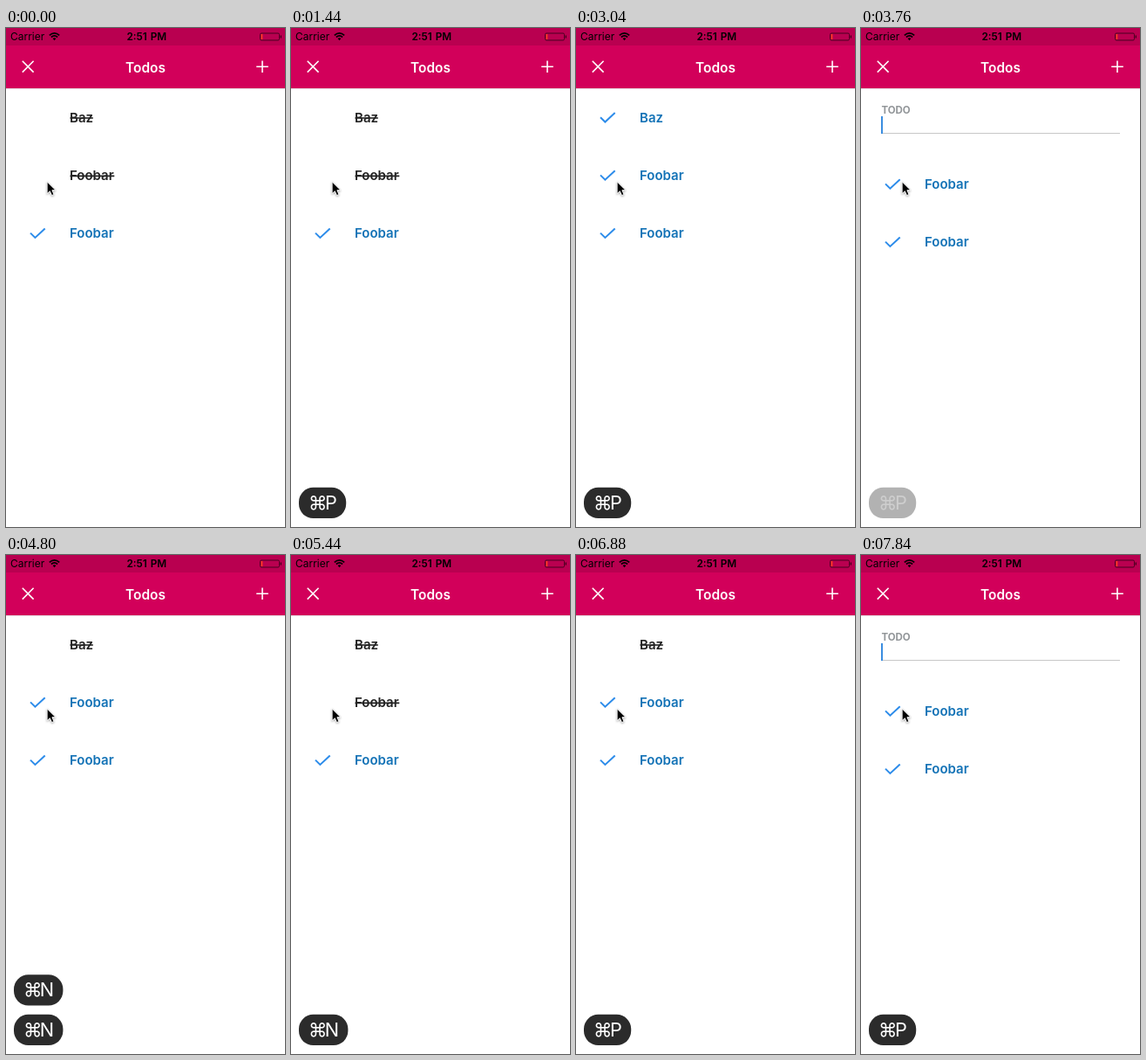
An HTML page that plays this animation: 320 by 571 pixels, repeating every 8 s.

```html
<!DOCTYPE html>
<html lang="en">
<head>
<meta charset="utf-8">
<title>Todos</title>
<style>
  html, body { margin: 0; width: 100%; height: 100%; overflow: hidden; background: #fff; }
  svg { display: block; width: 100%; height: 100%; }
  text { font: 600 15px Inter, "Liberation Sans", sans-serif; letter-spacing: 0; }

  .status { font-size: 12px; font-weight: 400; }
  .clock { font-size: 11.8px; font-weight: 600; word-spacing: 1px; }
  .title { font-size: 15.4px; fill: #fff; text-anchor: middle; }
  .line { fill: none; stroke: #fff; stroke-width: 1.6; }
  .check { fill: none; stroke: #2d8cea; stroke-width: 2; }
  .active text { fill: #1272b6; }
  .done text { fill: #222; }
  .done path { stroke: #222; stroke-width: 1.6; }
  .label { font-size: 11.5px; font-weight: 700; fill: #929699; }
  .badge rect { fill: #2b2b2b; }
  .badge text { font-size: 21.7px; font-weight: 400; fill: #fff; }
  .badge .cmd { font: 21.5px Inter, "DejaVu Sans", sans-serif; }

  /* One percent of the loop is 80 ms. */
  .anim { animation: 8s linear -16ms infinite; }
  .step { animation-timing-function: step-end; }

  .first-done { animation-name: first-done; }
  .first-active { animation-name: first-active; }
  .second-done { animation-name: second-done; }
  .second-active { animation-name: second-active; }
  .field { animation-name: field; }
  .caret { animation-name: caret; }
  .shift { animation-name: shift; }
  .prev { animation-name: prev; }
  .prev-old { animation-name: prev-old; }
  .next { animation-name: next; }
  .next-old { animation-name: next-old; }

  @keyframes first-done {
    0%, 33.5%, 59%, 89.5%  { opacity: 1; }
    35%, 57%, 91.5%, 100%  { opacity: 0; }
  }
  @keyframes first-active {
    0%, 33.5%, 41%, 53.5%, 59%, 89.5%, 97.5%, 100% { opacity: 0; }
    35%, 39%, 55.5%, 57%, 91.5%, 95.5%             { opacity: 1; }
  }
  @keyframes second-done {
    0%, 23.5%, 67.5%, 82.8%   { opacity: 1; }
    25.5%, 65.5%, 85%, 100%   { opacity: 0; }
  }
  @keyframes second-active {
    0%, 23.5%, 67.5%, 82.8%   { opacity: 0; }
    25.5%, 65.5%, 85%, 100%   { opacity: 1; }
  }
  @keyframes field {
    0%, 39%, 55.5%, 95.5%     { opacity: 0; }
    41%, 53.5%, 97.5%, 100%   { opacity: 1; }
  }
  @keyframes shift {
    0%, 39%, 55.5%, 95.5%     { transform: none; }
    41%, 53.5%, 97.5%, 100%   { transform: translateY(10px); }
  }
  @keyframes caret {
    0%, 48%, 60%, 100% { opacity: 1; }
    51%, 59%           { opacity: 0; }
  }

  /* Badges fade by fill, so plate and letters turn translucent separately. */
  @keyframes prev {
    0%, 32%, 48%           { fill-opacity: 0; }
    18%, 33%, 83%, 100%    { fill-opacity: 1; }
    31%, 47%               { fill-opacity: .36; }
  }
  @keyframes prev-old {
    0%, 97%, 100% { fill-opacity: 0; }
    90%           { fill-opacity: 1; }
    96%           { fill-opacity: .36; }
  }
  @keyframes next {
    0%, 81%, 100% { fill-opacity: 0; }
    54%           { fill-opacity: 1; }
    80%           { fill-opacity: .36; }
  }
  @keyframes next-old {
    0%, 67%, 100% { fill-opacity: 0; }
    57%           { fill-opacity: 1; }
    66%           { fill-opacity: .36; }
  }
</style>
</head>
<body>
<svg viewBox="0 0 320 571">
  <defs>
    <path id="tick" class="check" d="M28 -.8L33.4 4.5L44.7 -6"/>
    <g id="prev-key" class="badge">
      <rect x="9" width="54.2" height="35.2" rx="16.5"/>
      <text y="25.2"><tspan class="cmd" x="20">⌘</tspan><tspan x="39">P</tspan></text>
    </g>
    <g id="next-key" class="badge">
      <rect x="9" width="56.4" height="35.2" rx="16.5"/>
      <text y="25.2"><tspan class="cmd" x="20">⌘</tspan><tspan x="38.8">N</tspan></text>
    </g>
  </defs>

  <rect width="320" height="571" fill="#fff"/>
  <rect width="320" height="69" fill="#d2005a"/>
  <rect width="320" height="20" fill="#b90050"/>
  <rect y="69" width="320" height="1" fill="#000" fill-opacity=".1"/>

  <!-- Status bar -->
  <text class="status" x="5" y="14">Carrier</text>
  <g fill="none" stroke="#000" stroke-width="1.7">
    <path d="M49.8 8.3Q55.5 3.3 61.2 8.3"/>
    <path d="M51.9 10.5Q55.5 7.4 59.1 10.5"/>
  </g>
  <path d="M53.6 12.1Q55.5 10.5 57.4 12.1L55.5 14.2Z"/>
  <text class="status clock" x="161.3" y="14" text-anchor="middle">2:51 PM</text>
  <rect x="291.5" y="6" width="22" height="8" rx="1.5" fill="none" stroke="#4b0020"/>
  <rect x="292.5" y="7" width="1.8" height="6" fill="#ff3b20"/>
  <rect x="314.6" y="8.3" width="1.4" height="3.5" rx=".7" fill="#4b0020"/>

  <!-- Header -->
  <path class="line" d="M18.8 37.8L31.6 50.6M31.6 37.8L18.8 50.6"/>
  <text class="title" x="160" y="51">Todos</text>
  <path class="line" d="M287.2 44.2H300.8M294 37.4V51"/>

  <!-- First row -->
  <g transform="translate(0 103)">
    <g class="done anim first-done">
      <text x="73" y="5">Baz</text>
      <path d="M73.5 0H99.8"/>
    </g>
    <g class="active anim first-active">
      <use href="#tick"/>
      <text x="73" y="5">Baz</text>
    </g>
  </g>
  <g class="anim field">
    <text class="label" x="23.4" y="97.7">TODO</text>
    <rect x="24" y="120" width="273" height="1" fill="#c8c8c8"/>
    <rect class="anim caret" x="23" y="101" width="2" height="20" fill="#3b8de0"/>
  </g>

  <!-- Remaining rows -->
  <g class="anim shift">
    <g transform="translate(0 169.2)">
      <g class="done anim second-done">
        <text x="73" y="5">Foobar</text>
        <path d="M73.5 .2H124.3"/>
      </g>
      <g class="active anim second-active">
        <use href="#tick"/>
        <text x="73" y="5">Foobar</text>
      </g>
    </g>
    <g class="active" transform="translate(0 235.4)">
      <use href="#tick"/>
      <text x="73" y="5">Foobar</text>
    </g>
  </g>

  <!-- Key badges -->
  <g class="anim step prev-old"><use href="#prev-key" y="480.3"/></g>
  <g class="anim step prev"><use href="#prev-key" y="525.8"/></g>
  <g class="anim step next-old"><use href="#next-key" y="480.3"/></g>
  <g class="anim step next"><use href="#next-key" y="525.8"/></g>

  <!-- Pointer -->
  <path d="M47.6 176.6V190.4L50.8 187.5L53 192.4L55.6 191.3L53.4 186.5H57.6Z"
        transform="translate(-.5 -.8)" fill="#000" stroke="#fff" stroke-width="1"
        style="filter: drop-shadow(0 1px 1px #0005)"/>
</svg>
</body>
</html>
```
